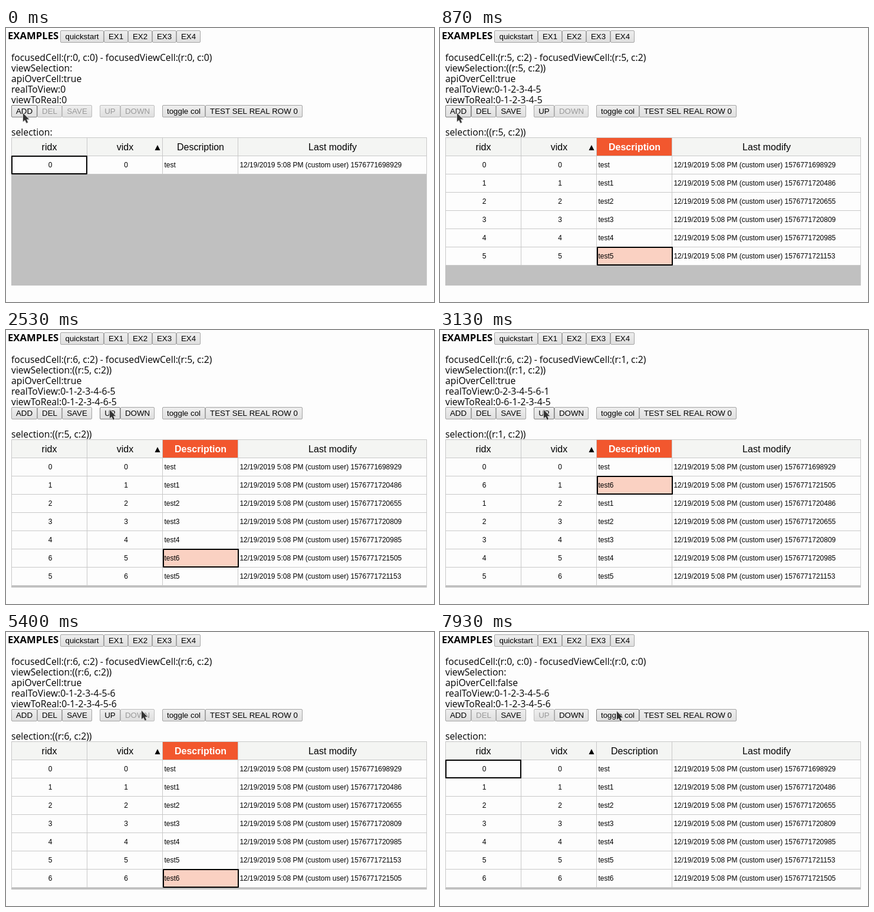
An HTML page with a canvas that plays this animation: 726x466 px, repeating every 8000 ms.

```html
<!DOCTYPE html>
<html lang="en">
<head>
<meta charset="utf-8">
<title>Grid examples</title>
<style>
  html, body { margin: 0; width: 100%; height: 100%; overflow: hidden; background: #fdfdfd; }
  canvas { display: block; }
</style>
</head>
<body>
<canvas id="stage" width="726" height="466"></canvas>
<script>
const ctx = document.getElementById('stage').getContext('2d');
const LOOP = 8000;
const UI = '"Liberation Sans", Arial, sans-serif';
const BODY = '"Open Sans", "Noto Sans", sans-serif';
const PAPER = '#fdfdfd', LINE = '#c8c8c8';

const LEFT = 9, RIGHT = 714, TOP = 186, BOTTOM = 438, ROW = 31;
const COLUMNS = [
  { title: 'ridx', weight: 1 },
  { title: 'vidx', weight: 1 },
  { title: 'Description', weight: 1 },
  { title: 'Last modify', weight: 2.5 }
];
const STAMPS = [698929, 720486, 720655, 720809, 720985, 721153, 721505];

// Times at which each button's click takes effect
const CLICKS = {
  ADD: [70, 235, 390, 565, 730, 1000],
  UP: [2200, 2600, 2770, 2930, 3070, 3200],
  DOWN: [4330, 4730, 4900, 5070, 5240, 5400],
  'toggle col': [7070, 7870]
};
const PRESS = 66;

// time, x, y of the pointer tip
const PATH = [
  [0, 29, 145], [1230, 29, 145], [1440, 120, 143], [1670, 231, 140], [1730, 207, 139],
  [1830, 207, 139], [1930, 176, 136], [3810, 176, 136], [4200, 230, 134],
  [6010, 230, 134], [6400, 366, 137], [6500, 384, 137], [6600, 379, 136],
  [6870, 300, 135], [LOOP, 300, 135]
];

const TABS = [['quickstart', 92, 74], ['EX1', 166, 41], ['EX2', 207, 41], ['EX3', 248, 41], ['EX4', 289, 41]];
const ACTIONS = [
  ['ADD', 9, 44], ['DEL', 53, 42], ['SAVE', 95, 51], ['UP', 159, 35], ['DOWN', 194, 58],
  ['toggle col', 265, 73], ['TEST SEL REAL ROW 0', 338, 165]
];

const count = (name, t) => CLICKS[name].filter(c => c <= t).length;

function stateAt(t) {
  const added = count('ADD', t), toggles = count('toggle col', t);
  const order = Array.from({ length: added + 1 }, (_, i) => i);
  let row = added;
  if (added === 6) {
    row = 6 - count('UP', t) + count('DOWN', t);
    order.splice(row, 0, order.pop());
  }
  const selected = added > 0 && !toggles;
  if (!selected) row = 0;
  return {
    order, row, selected, added,
    col: selected ? 2 : 0,
    over: !toggles,
    hidden: toggles === 1 ? 2 : -1
  };
}

function pointerAt(t) {
  const i = Math.max(1, PATH.findIndex(p => p[0] > t));
  const [t0, x0, y0] = PATH[i - 1], [t1, x1, y1] = PATH[i];
  const k = (t - t0) / (t1 - t0);
  return { x: Math.round(x0 + (x1 - x0) * k), y: Math.round(y0 + (y1 - y0) * k) };
}

function fill(x, y, w, h, color) {
  ctx.fillStyle = color;
  ctx.fillRect(x, y, w, h);
}

function text(str, x, y, font, color = '#000', align = 'left') {
  ctx.font = font;
  ctx.fillStyle = color;
  ctx.textAlign = align;
  ctx.fillText(str, x, y);
}

function button([label, x, w], y, { hover, pressed, disabled } = {}) {
  const shade = ctx.createLinearGradient(0, y, 0, y + 21);
  shade.addColorStop(0, pressed ? '#e8e8e8' : '#efefef');
  shade.addColorStop(1, pressed ? '#f2f2f2' : '#dedede');
  ctx.beginPath();
  ctx.roundRect(x + 0.5, y + 0.5, w - 1, 20, 1.5);
  ctx.fillStyle = shade;
  ctx.fill();
  ctx.lineWidth = 1;
  ctx.strokeStyle = hover ? '#7c7c7c' : disabled ? '#bcbcbc' : '#a4a4a4';
  ctx.stroke();
  text(label, x + w / 2, y + 15, '13.333px ' + UI, disabled ? '#999' : '#000', 'center');
}

function drawTop(s, t, mouse) {
  text('EXAMPLES', 3, 19, 'bold 16.7px ' + BODY);
  TABS.forEach(b => button(b, 4));

  const view = s.order, real = view.map((_, i) => view.indexOf(i));
  const sel = s.selected ? `((r:${s.row}, c:${s.col}))` : '';
  const font = '15.75px ' + BODY;
  [
    `focusedCell:(r:${view[s.row]}, c:${s.col}) - focusedViewCell:(r:${s.row}, c:${s.col})`,
    'viewSelection:' + sel,
    'apiOverCell:' + s.over,
    'realToView:' + real.join('-'),
    'viewToReal:' + view.join('-')
  ].forEach((str, i) => text(str, 9, 56 + i * 18, font));
  text('selection:' + sel, 9, 183, font);

  const off = {
    DEL: !s.selected,
    SAVE: !s.added,
    UP: s.row === 0,
    DOWN: s.row === s.added
  };
  ACTIONS.forEach(b => {
    const [name, x, w] = b;
    button(b, 131, {
      disabled: off[name],
      hover: !off[name] && mouse.x >= x && mouse.x < x + w,
      pressed: (CLICKS[name] || []).some(c => t < c && t >= c - PRESS)
    });
  });
}

function layout(hidden) {
  const shown = COLUMNS.map((c, i) => ({ ...c, id: i })).filter(c => c.id !== hidden);
  const unit = (RIGHT - LEFT) / shown.reduce((sum, c) => sum + c.weight, 0);
  let edge = LEFT + 0.4;
  return shown.map(c => {
    const x = Math.round(edge);
    edge += unit * c.weight;
    return { ...c, x, w: Math.round(edge) - x };
  });
}

function drawTable(s) {
  const cols = layout(s.hidden), rows = s.order.length, width = RIGHT - LEFT;
  const end = TOP + ROW * (rows + 1);
  fill(LEFT, TOP, width, BOTTOM - TOP, '#c0c0c0');
  fill(LEFT, TOP, width, ROW, '#f4f5f3');
  fill(LEFT, TOP + ROW, width, ROW * rows, PAPER);

  for (const c of cols) {
    const active = s.selected && c.id === s.col;
    if (active) {
      fill(c.x, TOP, c.w, ROW, '#f2572e');
      fill(c.x, TOP + ROW * (s.row + 1), c.w, ROW, '#fad1c2');
    }
    const font = (active ? 'bold ' : '') + '16px ' + UI;
    text(c.title, c.x + c.w / 2, 208, font, active ? '#fff' : '#000', 'center');
    if (c.id === 1) {
      const ax = c.x + c.w - 9;
      ctx.fillStyle = '#000';
      ctx.beginPath();
      ctx.moveTo(ax, 199);
      ctx.lineTo(ax + 4.5, 208);
      ctx.lineTo(ax - 4.5, 208);
      ctx.fill();
    }
    s.order.forEach((id, v) => {
      const y = 237 + v * ROW;
      const values = [id, v, 'test' + (id || ''), '12/19/2019 5:08 PM (custom user) 1576771' + STAMPS[id]];
      const mid = c.id < 2;
      text(values[c.id], c.x + (mid ? c.w / 2 + 1.5 : 2.4), y, '12px ' + UI, '#000', mid ? 'center' : 'left');
    });
  }

  for (let i = 0; i <= rows + 1; i++) fill(LEFT, TOP + i * ROW, width, 1, LINE);
  for (const c of cols) fill(Math.max(LEFT, c.x - 1), TOP, 1, end - TOP, LINE);
  fill(RIGHT - 1, TOP, 1, BOTTOM - TOP, LINE);

  const f = cols.find(c => c.id === s.col);
  ctx.strokeStyle = '#000';
  ctx.lineWidth = 2;
  ctx.strokeRect(f.x + 1, TOP + ROW * (s.row + 1) + 1, Math.floor(f.w / 2) * 2 - 1, ROW - 1);
}

function drawPointer({ x, y }) {
  const tip = [[0, 0], [0, 14], [3.2, 11.2], [5.7, 16.6], [8, 15.5], [5.7, 10.2], [10, 10.2]];
  ctx.beginPath();
  tip.forEach(([dx, dy]) => ctx.lineTo(x + dx, y + dy));
  ctx.closePath();
  ctx.lineJoin = 'round';
  ctx.lineWidth = 2;
  ctx.strokeStyle = '#d8d8d8';
  ctx.stroke();
  ctx.fillStyle = '#333';
  ctx.fill();
}

function draw(now) {
  const t = now % LOOP, s = stateAt(t), mouse = pointerAt(t);
  fill(0, 0, 726, 466, PAPER);
  drawTop(s, t, mouse);
  drawTable(s);
  drawPointer(mouse);
}

const start = performance.now();
function tick() {
  draw(performance.now() - start);
  requestAnimationFrame(tick);
}
tick();
</script>
</body>
</html>
```
